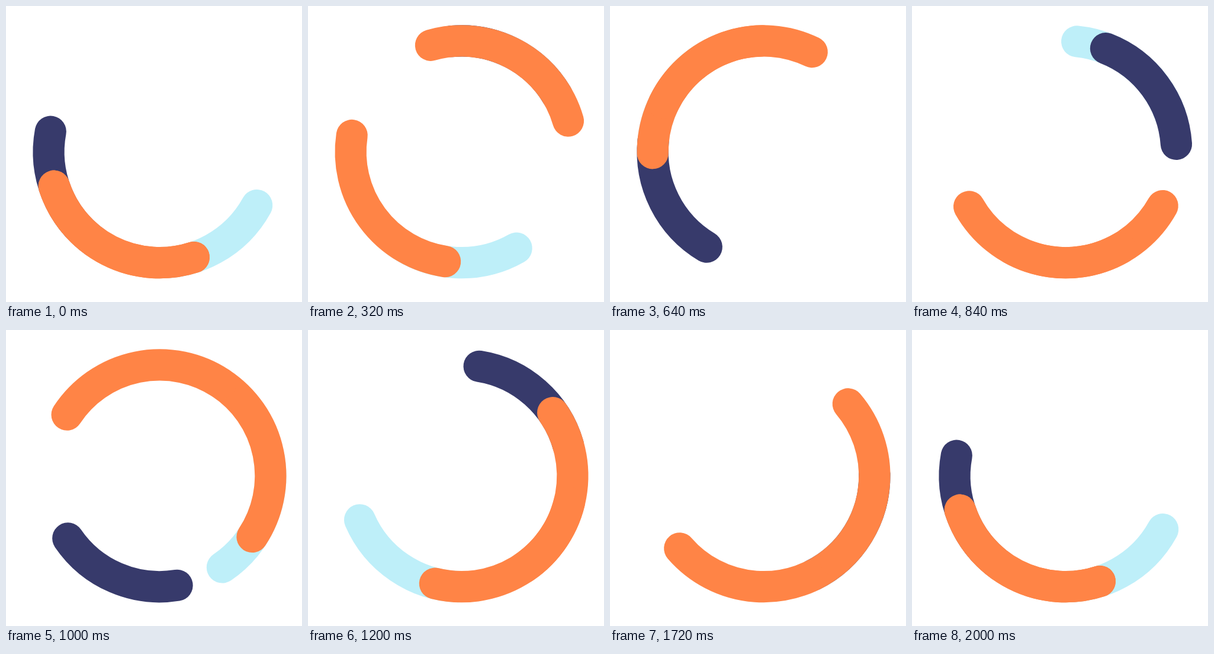
Write an HTML page with a canvas that moves like this. It is 500x500 px and loops after 2.08 s.

```html
<!DOCTYPE html>
<html lang="en">
<head>
<meta charset="utf-8">
<title>Ring loader</title>
<style>
  html, body { margin: 0; width: 100%; height: 100%; overflow: hidden; background: #fff; }
  canvas { display: block; width: 500px; height: 500px; }
</style>
</head>
<body>
<canvas id="stage" width="500" height="500"></canvas>
<script>
const ctx = document.getElementById('stage').getContext('2d');
const STEP = 40, STEPS = 50, LOOP = 2080;
const CX = 259.5, CY = 246.3, RADIUS = 187.4, WIDTH = 53.2;
const TAU = 2 * Math.PI;

// Each arc makes whole turns per loop; its speed swells and fades by two
// harmonics, sway = [sin, cos] of the first and second, in degrees.
const arcs = [
  { color: '#beeff9', sweep: 64.8, start: 28.8, turns: 2, sway: [[-70.5, -19], [-16.9, 0]] },
  { color: '#373a6b', sweep: 64.8, start: 125.7, turns: 4, sway: [[-93.4, -22.4], [-7.5, 3.1]] },
  { color: '#ff8446', sweep: 90, start: 72, turns: 4, sway: [[-288, -64.3], [44.6, 20.2]] },
  { color: '#ff8446', sweep: 90, start: 72, turns: 4, sway: [[-75.6, 70.7], [-11.5, -5]] }
];

function angleAt({ start, turns, sway }, p) {
  return sway.reduce((angle, [s, c], i) => {
    const w = TAU * (i + 1) * p;
    return angle + s * Math.sin(w) + c * (1 - Math.cos(w));
  }, start + 360 * turns * p);
}

function draw(p) {
  ctx.fillStyle = '#fff';
  ctx.fillRect(0, 0, 500, 500);
  ctx.lineWidth = WIDTH;
  ctx.lineCap = 'round';
  for (const arc of arcs) {
    const from = angleAt(arc, p) % 360 * TAU / 360;
    ctx.strokeStyle = arc.color;
    ctx.beginPath();
    ctx.arc(CX, CY, RADIUS, from, from + arc.sweep * TAU / 360);
    ctx.stroke();
  }
}

const began = performance.now();
function tick() {
  const t = (performance.now() - began) % LOOP;
  draw(Math.min(Math.floor(t / STEP), STEPS) % STEPS / STEPS);
  requestAnimationFrame(tick);
}
tick();
</script>
</body>
</html>
```
